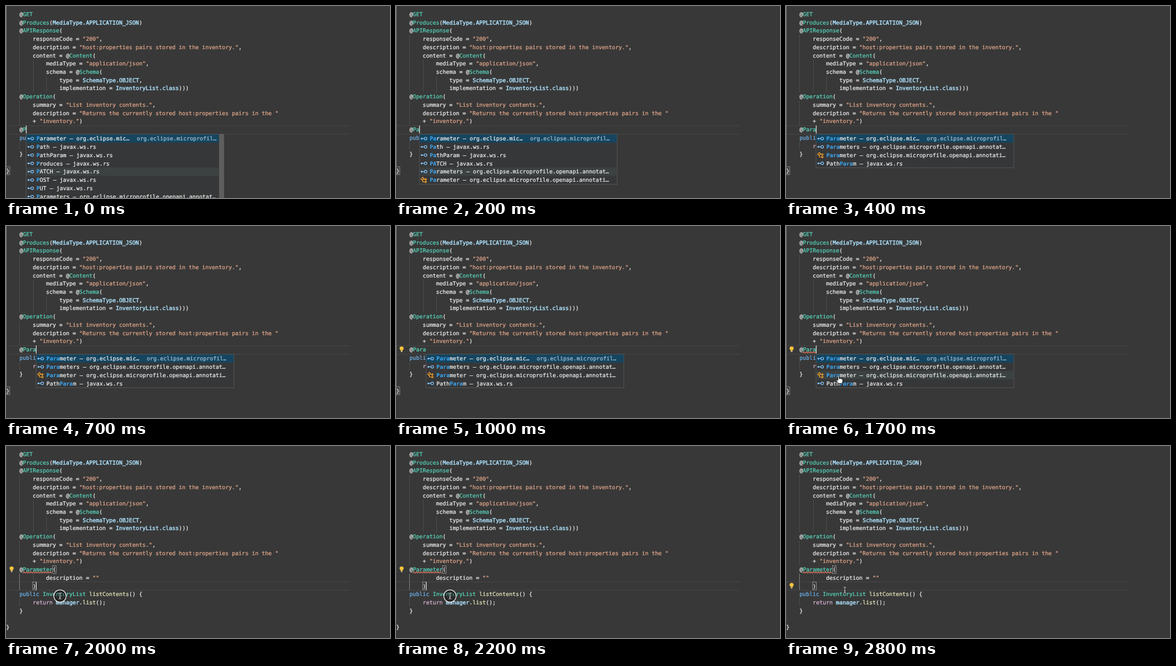
These frames come from a looping animation (640 by 320 pixels, 2.9 s). An HTML page:

```html
<!DOCTYPE html>
<html lang="en">
<head>
<meta charset="utf-8">
<title>Code completion</title>
<style>
  html, body { margin: 0; width: 100%; height: 100%; overflow: hidden; background: #383838; }
  svg { display: block; width: 640px; height: 320px; }
  text {
    font: 9.2px "DejaVu Sans Mono", monospace;
    white-space: pre;
    text-rendering: geometricPrecision;
    color: #f0f0f0;
  }
  text, tspan { fill: currentColor; stroke: currentColor; stroke-width: .22px; }
  .str { color: #e5a98c; }
  .type { color: #57d6bc; }
  .var { color: #aee4ff; stroke-width: .4px; }
  .key { color: #6cb2ea; }
  .flow { color: #d8b4d5; }
  .fn { color: #ecebc0; }
  .hit { color: #3aa9f7; font-weight: bold; stroke: none; }
  .detail { color: #a3c0d2; }
  .guide { stroke: #4a4a4a; }
  .active { stroke: #7c7c7c; }
  .edge { stroke: #454545; }
  .box { fill: none; stroke: #9a9a9a; stroke-width: .8; }
  .squiggle { fill: none; stroke: #ea7a62; stroke-width: 1.1; }
</style>
</head>
<body>
<svg viewBox="0 0 640 320"><g id="code"></g><g id="overlay"></g></svg>
<script>
const LOOP = 2900, STEP = 100, PICK = 1900;
const CHAR = 5.54, LINE = 13.72, ROW = 13.8, EDIT = 14;

const colX = c => .3 + c * CHAR;
const rowY = n => 13.7 + n * LINE;
const indentOf = s => s.search(/\S/);

const head = `    @GET
    @Produces(MediaType.APPLICATION_JSON)
    @APIResponse(
        responseCode = "200",
        description = "host:properties pairs stored in the inventory.",
        content = @Content(
            mediaType = "application/json",
            schema = @Schema(
                type = SchemaType.OBJECT,
                implementation = InventoryList.class)))
    @Operation(
        summary = "List inventory contents.",
        description = "Returns the currently stored host:properties pairs in the "
        + "inventory.")`.split('\n');
const tail = `    public InventoryList listContents() {
        return manager.list();
    }

}`.split('\n');
const picked = ['    @Parameter(', '            description = ""', '        )'];

const rules = [
  ['str', /"[^"]*"/],
  ['type', /(?<=@)\w+/],
  ['var', /(?:MediaType|SchemaType)\.\w+|InventoryList\.class|manager/],
  ['type', /InventoryList/],
  ['key', /public/],
  ['flow', /return/],
  ['fn', /list\w*(?=\()/]
];
const lexer = new RegExp(rules.map(r => `(${r[1].source})`).join('|'), 'g');

const span = (cls, s) => `<tspan class="${cls}">${s}</tspan>`;
const label = (x, y, s, cls = '') => `<text class="${cls}" x="${x}" y="${y}">${s}</text>`;
const rect = (x, y, w, h, attrs) => `<rect x="${x}" y="${y}" width="${w}" height="${h}" ${attrs}/>`;
const line = (x1, y1, x2, y2, cls) => `<path class="${cls}" d="M${x1} ${y1}L${x2} ${y2}"/>`;
const at = (x, y, body) => `<g transform="translate(${x} ${y})">${body}</g>`;

const paint = s => s.replace(lexer, (m, ...groups) =>
  span(rules[groups.findIndex((g, i) => i < rules.length && g)][0], m));

function codeLine(s, n) {
  const indent = indentOf(s);
  return indent < 0 ? '' : label(colX(indent), rowY(n) + 3.3, paint(s.trim()));
}

// Indent guides; the one enclosing the caret's block is brighter
function guides(lines, caretRow) {
  const depth = lines.map(s => s ? indentOf(s) : 1);
  const active = depth[caretRow] - 4;
  let from = caretRow, to = caretRow;
  while (depth[from - 1] > active) from--;
  while (depth[to + 1] > active) to++;
  return depth.map((indent, n) => {
    let out = '';
    for (let c = 0; c < indent; c += 4) {
      const x = Math.round(colX(c)) + .5;
      const lit = c === active && n >= from && n <= to;
      out += line(x, n ? rowY(n) - LINE / 2 : 0, x, rowY(n) + LINE / 2, lit ? 'active' : 'guide');
    }
    return out;
  }).join('');
}

const bracket = (c, n) => rect(colX(c) - .3, rowY(n) - 6.4, CHAR + .6, 13, 'class="box"');

function squiggle(chars) {
  const x = colX(5), y = rowY(EDIT) + 6;
  let d = `M${x} ${y}`;
  for (let i = 1; i * 2 <= chars * CHAR; i++) d += `L${x + i * 2} ${y - (i % 2) * 2}`;
  return `<path class="squiggle" d="${d}"/>`;
}

// Completion list
const ann = 'org.eclipse.microprofile.openapi.annotat';
const items = [
  ['Parameter', 'org.eclipse.mic…', 'org.eclipse.microprofil…'],
  ...['Path', 'PathParam', 'Produces', 'PATCH', 'POST', 'PUT'].map(s => [s, 'javax.ws.rs']),
  ['Parameters', ann + '…'],
  ['Parameter', ann + 'i…', '', true]
];

const ringIcon = `<g fill="none" stroke="#86c6fb" stroke-width="1.1"><path d="M4 0H8"/>
  <circle cx="10.2" cy="0" r="2.2"/></g><circle cx="3.8" cy="0" r="1.5" fill="#86c6fb"/>`;
const classIcon = `<g fill="none" stroke="#ee9d28" stroke-width="1.1">
  <path d="M2.5-1.5L5.5-4.5L7.5-2.5L4.5 .5ZM6.5-1H9M5.5 0V3.2H9"/>
  <path d="M9-1L10.5-2.5L12-1L10.5 .5ZM9 3.2L10.5 1.7L12 3.2L10.5 4.7Z"/></g>`;

function popup(typed, mouseY) {
  const key = typed.toLowerCase();
  const pos = it => it[0].toLowerCase().indexOf(key);
  const list = items.filter(it => pos(it) >= 0).sort((a, b) => pos(a) - pos(b));
  const x = colX(5 + typed.length), y = 213.6, scrolls = list.length > 8;
  const hover = Math.floor((mouseY - y) / ROW);
  let out = rect(x, y, 329.6, list.length * ROW + .8, 'fill="#363738" stroke="#545454"');
  list.forEach(([name, from, detail, isClass], i) => {
    const top = y + i * ROW + .4, mid = top + ROW / 2, p = pos(list[i]), e = p + key.length;
    const fill = i === 0 ? '#16455f' : i === hover ? '#3c4142' : '';
    if (fill) out += rect(x + .5, top, scrolls ? 321 : 328.6, ROW, `fill="${fill}"`);
    out += at(x, mid, isClass ? classIcon : ringIcon);
    out += label(x + 17.2, mid + 3.3,
      name.slice(0, p) + span('hit', name.slice(p, e)) + name.slice(e) + ' – ' + from);
    if (detail) out += label(x + 184.4, mid + 3.3, detail, 'detail');
  });
  return out + (scrolls ? rect(x + 321.6, y, 8, 107, 'fill="#5e5e5e"') : '');
}

const bulb = n => at(9.4, rowY(n) - .6, `<path fill="#fcc43c"
  d="M0-4.4C4.4-4.4 4 0 1.7 1.8V3H-1.7V1.8C-4 0-4.4-4.4 0-4.4Z"/>
  <path fill="#e3d7b0" d="M-1.4 3.5H1.4V4.8H-1.4Z"/>`);

const hand = `<path fill="#fff" stroke="#111" stroke-width=".9" stroke-linejoin="round"
  d="M-1 1C-1-.5 1-.5 1 1V5L3 4.6L5 5.2L7 6V9.5L5.6 13H.2L-3.6 8.2C-4 7-2.4 6.4-1 8Z"/>`;
const beamPath = 'M-2.2-5Q0-5 0-3.6Q0-5 2.2-5M0-4V4M-2.2 5Q0 5 0 3.6Q0 5 2.2 5M-1.2 1.5H1.2';
const beam = `<g fill="none"><path stroke="#1c1c1c" stroke-width="2.2" d="${beamPath}"/>
  <path stroke="#e4e4e4" stroke-width=".9" d="${beamPath}"/></g>`;
const ring = `<circle r="9" fill="#000" fill-opacity=".25" stroke="#161616" stroke-width="2"/>
  <circle r="10.2" fill="none" stroke="#e6e6e6" stroke-width="1.3"/>`;

// Pointer path: time, x, y
const path = [[0, 54, 276], [1200, 54, 276], [1300, 55, 246], [1400, 58, 230],
  [1700, 87.5, 249.5], [1900, 90, 250], [2400, 90, 250], [2800, 98, 240]];
function pointer(t) {
  const i = path.findIndex(p => p[0] > t);
  if (i < 0) return path.at(-1).slice(1);
  const a = path[i - 1], b = path[i], k = (t - a[0]) / (b[0] - a[0]);
  return [a[1] + (b[1] - a[1]) * k, a[2] + (b[2] - a[2]) * k];
}

function draw(t) {
  const done = t >= PICK;
  const typed = 'Para'.slice(0, t < 200 ? 1 : t < 300 ? 2 : t < 400 ? 3 : 4);
  const lines = [...head, ...(done ? picked : ['    @' + typed]), ...tail];
  const caretRow = done ? EDIT + 2 : EDIT, caretX = colX(done ? 9 : 5 + typed.length);
  const [mx, my] = pointer(t);

  const edges = [-1, 1].map(s => {
    const y = Math.round(rowY(caretRow) + s * LINE / 2) + .5;
    return line(0, y, 572, y, 'edge');
  }).join('');
  document.getElementById('code').innerHTML =
    edges + guides(lines, caretRow) + lines.map(codeLine).join('');

  let out = done ? bracket(14, EDIT) + bracket(8, EDIT + 2) : bracket(0, lines.length - 1);
  if (t >= 1300) out += squiggle(done ? 9 : 4);
  if (t >= 900) out += bulb(t >= 2500 ? EDIT + 2 : EDIT);
  const blinkStart = done ? PICK : 400;
  if (t < blinkStart || (t - blinkStart) % 1000 < 500)
    out += rect(caretX - .4, rowY(caretRow) - 6.6, 1.2, 13.2, 'fill="#e6e6e6"');
  if (!done) out += popup(typed, my);
  if (t >= 1300) out += at(mx, my, done ? (t < 2400 ? ring : '') + beam : hand);
  document.getElementById('overlay').innerHTML = out;
}

let shown = -1;
function tick() {
  const t = Math.floor(performance.now() % LOOP / STEP) * STEP;
  if (t !== shown) draw(shown = t);
  requestAnimationFrame(tick);
}
tick();
</script>
</body>
</html>
```
